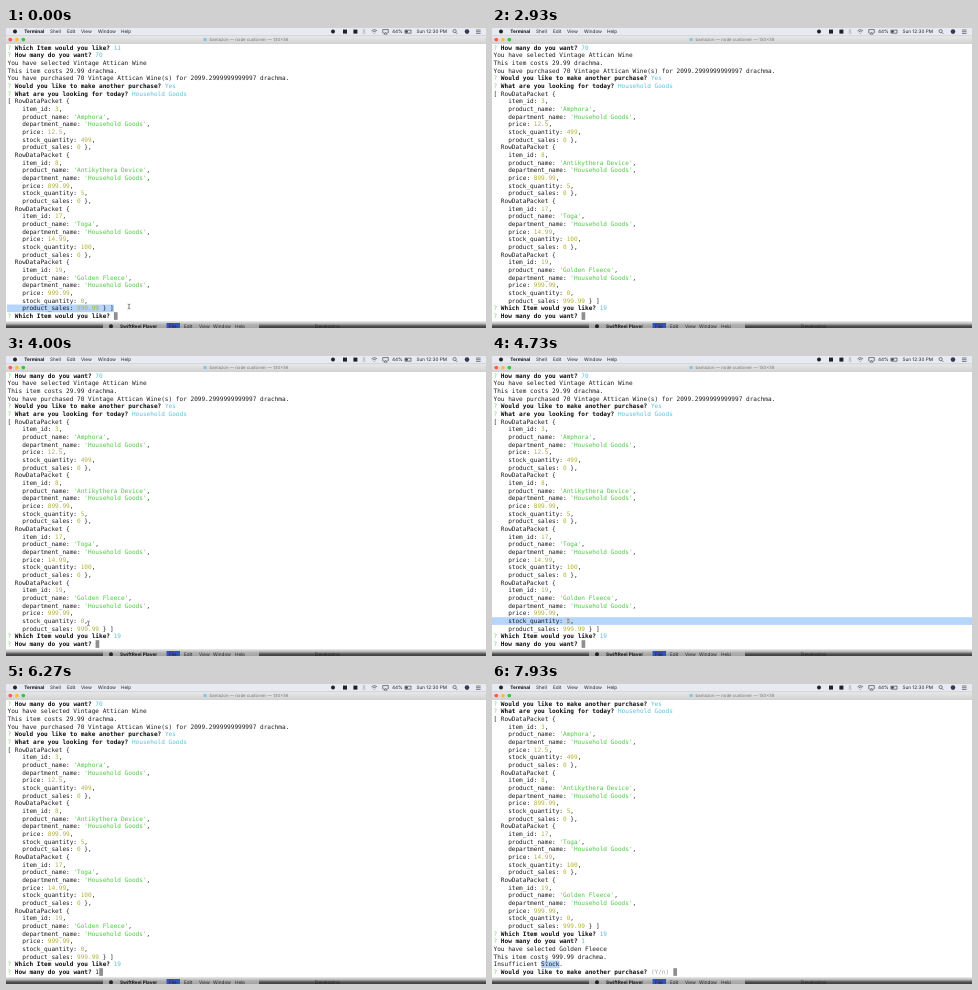
Animation, 480 px wide and 300 px high, one loop 8 s. Source, as an HTML page:

```html
<!DOCTYPE html>
<html lang="en">
<head>
<meta charset="utf-8">
<title>Terminal session</title>
<style>
  html, body { margin: 0; width: 100%; height: 100%; overflow: hidden; background: #fff; }
  svg { display: block; width: 100vw; height: 100vh; }
  text { white-space: pre; text-rendering: geometricPrecision; }
  .mono { font: 6.096px "DejaVu Sans Mono", monospace; fill: #1c1c1c; }
  .ui { font: 4.7px Inter, Roboto, sans-serif; fill: #222; }
  .title { font-size: 4.35px; fill: #777; text-anchor: middle; }
  .b { font-weight: 700; fill: #111; }
  .g { fill: #4cc441; }
  .q { fill: #74d06c; }
  .c { fill: #5dbcda; }
  .y { fill: #b3b038; }
  .d { fill: #a2a2a2; }
</style>
</head>
<body>
<svg viewBox="0 0 480 300" preserveAspectRatio="none">
  <defs>
    <linearGradient id="bar" x2="0" y2="1">
      <stop offset="0" stop-color="#e9e9e9"/>
      <stop offset="1" stop-color="#d3d3d3"/>
    </linearGradient>
    <linearGradient id="shade" x2="0" y2="1">
      <stop offset="0" stop-color="#f2f2f2"/>
      <stop offset=".4" stop-color="#b4b4b4"/>
      <stop offset=".7" stop-color="#555"/>
      <stop offset="1" stop-color="#3c3c3c"/>
    </linearGradient>
    <linearGradient id="strip" x2="0" y2="1">
      <stop offset="0" stop-color="#ececec"/>
      <stop offset=".5" stop-color="#b4b4b4"/>
      <stop offset="1" stop-color="#a0a0a0"/>
    </linearGradient>
  </defs>
  <rect width="480" height="300" fill="#fff"/>
  <rect id="sel" height="7.66" fill="#b5d5fb"/>
  <rect id="caret" width="3.67" height="7.66" fill="#8e8e8e"/>
  <g id="lines" class="mono"></g>

  <rect width="480" height="8" fill="#e7eaf2"/>
  <rect y="7.6" width="480" height="8" fill="url(#bar)"/>
  <path d="M0 7.6H480M0 15.5H480" stroke="#b4b4b4" stroke-width=".4"/>
  <g id="menu" class="ui"></g>
  <circle cx="9" cy="3.6" r="2" fill="#222"/>
  <circle cx="4.3" cy="11.6" r="1.9" fill="#fc5b57"/>
  <circle cx="10.9" cy="11.6" r="1.9" fill="#fdbc40"/>
  <circle cx="17.3" cy="11.6" r="1.9" fill="#34c84a"/>
  <rect x="197.4" y="10.1" width="3.4" height="2.8" rx=".4" fill="#8cc4e2"/>

  <g fill="#222">
    <circle cx="327" cy="3.6" r="2"/>
    <rect x="337" y="1.6" width="4" height="4"/>
    <rect x="347.4" y="1.6" width="4" height="4"/>
    <circle cx="461" cy="3.6" r="2.3" fill="#3d3852"/>
  </g>
  <g fill="none" stroke="#333" stroke-width=".6">
    <path d="M356.4 2.2l3 2.8-1.5 1.3V.9l1.5 1.3-3 2.8" stroke="#999" stroke-width=".4"/>
    <path d="M365.5 2.8a4 4 0 0 1 5.6 0M366.6 4a2.4 2.4 0 0 1 3.4 0M367.9 5.4h.8"/>
    <path d="M377.6 4.8h-.9V1.6h5.6v3.2h-.9M377.8 6.1l1.7-2 1.7 2z"/>
    <rect x="399" y="2.1" width="6" height="3"/>
    <path d="M399.4 3.6h2.3" stroke-width="2"/>
    <circle cx="448.6" cy="3.1" r="1.6"/>
    <path d="M449.8 4.3l1.6 1.7M470 2h4.6M470 3.7h4.6M470 5.4h4.6"/>
  </g>

  <rect y="293" width="480" height="7" fill="url(#shade)"/>
  <rect x="97" y="293" width="156" height="7" fill="url(#strip)"/>
  <rect x="160.5" y="295" width="13.5" height="5" fill="#2f56b8"/>
  <circle cx="105" cy="298.2" r="2" fill="#222"/>
  <g id="dock" class="ui"></g>

  <g id="mouse" fill="none" stroke-linecap="round">
    <path id="beam" d="M-1-2.4Q0-2.4 0-1.6V1.6Q0 2.4-1 2.4M1-2.4Q0-2.4 0-1.6M0 1.6Q0 2.4 1 2.4" stroke="#fff" stroke-width="1.2"/>
    <use href="#beam" style="stroke:#333"/>
  </g>
</svg>
<script>
const LOOP = 8000, LEFT = 1.5, TOP = 16, CW = 3.67, RH = 7.663;
const $ = id => document.getElementById(id);
const span = (cls, s) => `<tspan class="${cls}">${s}</tspan>`;
const set = (el, attrs) => { for (const k in attrs) el.setAttribute(k, attrs[k]); };

// The pointer is a dark beam over a light outline
const beam = $("beam").cloneNode();
beam.removeAttribute("id");
set(beam, { stroke: "#333", "stroke-width": .55 });
$("mouse").replaceChild(beam, $("mouse").lastElementChild);

// Interface labels: [x, text, class]
const labels = (id, y, list) => {
  $(id).innerHTML += list.map(([x, s, cls = ""]) =>
    `<text x="${x}" y="${y}" class="${cls}">${s}</text>`).join("");
};
labels("menu", 5.3, [[18.3, "Terminal", "b"], [44, "Shell"], [61, "Edit"], [75, "View"],
  [92, "Window"], [115, "Help"], [386, "44%"], [410.5, "Sun 12:30 PM"]]);
labels("menu", 13.1, [[243, "bamazon — node customer — 130×36", "title"]]);
labels("dock", 299.8, [[114, "SwiftReel Player", "b"], [163, "File"], [178, "Edit"], [193, "View"],
  [207, "Window"], [229, "Help"], [309, "Developing"]]);

// Terminal content
const ask = (q, answer) => span("q", "? ") + span("b", q + " ") + answer;
const done = (q, answer) => ask(q, span("c", answer));
const WHICH = "Which Item would you like?", MANY = "How many do you want?";
const AGAIN = "Would you like to make another purchase?";

function packet([id, name, price, stock, sales], i, all) {
  const field = (key, v) => `    ${key}: ` +
    (typeof v === "string" ? span("g", `'${v}'`) : span("y", v));
  const end = i === all.length - 1 ? " } ]" : " },";
  return [
    (i ? "  " : "[ ") + "RowDataPacket {",
    field("item_id", id) + ",",
    field("product_name", name) + ",",
    field("department_name", "Household Goods") + ",",
    field("price", price) + ",",
    field("stock_quantity", stock) + ",",
    field("product_sales", sales) + end
  ];
}

const history = [
  done(WHICH, "11"),
  done(MANY, "70"),
  "You have selected Vintage Attican Wine",
  "This item costs 29.99 drachma.",
  "You have purchased 70 Vintage Attican Wine(s) for 2099.2999999999997 drachma.",
  done(AGAIN, "Yes"),
  done("What are you looking for today?", "Household Goods"),
  ...[
    [3, "Amphora", 12.5, 499, 0],
    [8, "Antikythera Device", 899.99, 5, 0],
    [17, "Toga", 14.99, 100, 0],
    [19, "Golden Fleece", 999.99, 0, 999.99]
  ].flatMap(packet)
];

const ENTER1 = 2930, ENTER2 = 6330;

function session(t) {
  if (t < ENTER1) {
    const typed = t < 1070 ? "" : t < 1670 ? "1" : "19";
    return { lines: [...history, ask(WHICH, typed)], col: 29 + typed.length };
  }
  const first = [...history, done(WHICH, "19")];
  if (t < ENTER2) {
    const typed = t < 5800 ? "" : "1";
    return { lines: [...first, ask(MANY, typed)], col: 24 + typed.length };
  }
  return {
    lines: [...first, done(MANY, "1"), "You have selected Golden Fleece",
      "This item costs 999.99 drachma.", "Insufficient Stock.",
      ask(AGAIN, span("d", "(Y/n) "))],
    col: 49
  };
}

// Selections: [from, to, row, x, width]
const picks = [
  [0, 70, 34, 1, 107],
  [4600, 5130, 32, 0, 480],
  [7930, LOOP, 34, LEFT + 13 * CW, 5 * CW]
];

// Pointer keys per visible stretch: [time, x, y]
const tracks = [
  [[0, 123, 278.5], [1070, 123, 278.5]],
  [[3300, 123, 278.5], [3730, 84, 268], [3870, 84, 268], [4330, 76, 265], [5800, 76, 265]],
  [[6600, 66, 281.5], [6960, 66, 281.5], [7130, 54.5, 277], [LOOP, 54.5, 277]]
];

function pointer(t) {
  const keys = tracks.find(k => t >= k[0][0] && t < k[k.length - 1][0]);
  if (!keys) return null;
  const i = keys.findIndex(k => t < k[0]);
  const [t0, x0, y0] = keys[i - 1], [t1, x1, y1] = keys[i];
  const u = (t - t0) / (t1 - t0), e = u * u * (3 - 2 * u);
  return [x0 + (x1 - x0) * e, y0 + (y1 - y0) * e];
}

let shown = "";
function draw(t) {
  const { lines, col } = session(t);
  const html = lines.slice(-36).map((s, row) =>
    `<text x="${LEFT}" y="${TOP + 5.7 + row * RH}">${s}</text>`).join("");
  if (html !== shown) $("lines").innerHTML = shown = html;
  set($("caret"), { x: LEFT + col * CW, y: TOP + 35 * RH });

  const pick = picks.find(p => t >= p[0] && t < p[1]);
  set($("sel"), pick
    ? { y: TOP + pick[2] * RH, x: pick[3], width: pick[4] }
    : { width: 0 });

  const pos = pointer(t);
  set($("mouse"), pos
    ? { transform: `translate(${pos})`, visibility: "visible" }
    : { visibility: "hidden" });
}

function tick(now) {
  draw(now % LOOP);
  requestAnimationFrame(tick);
}
draw(0);
requestAnimationFrame(tick);
</script>
</body>
</html>
```
